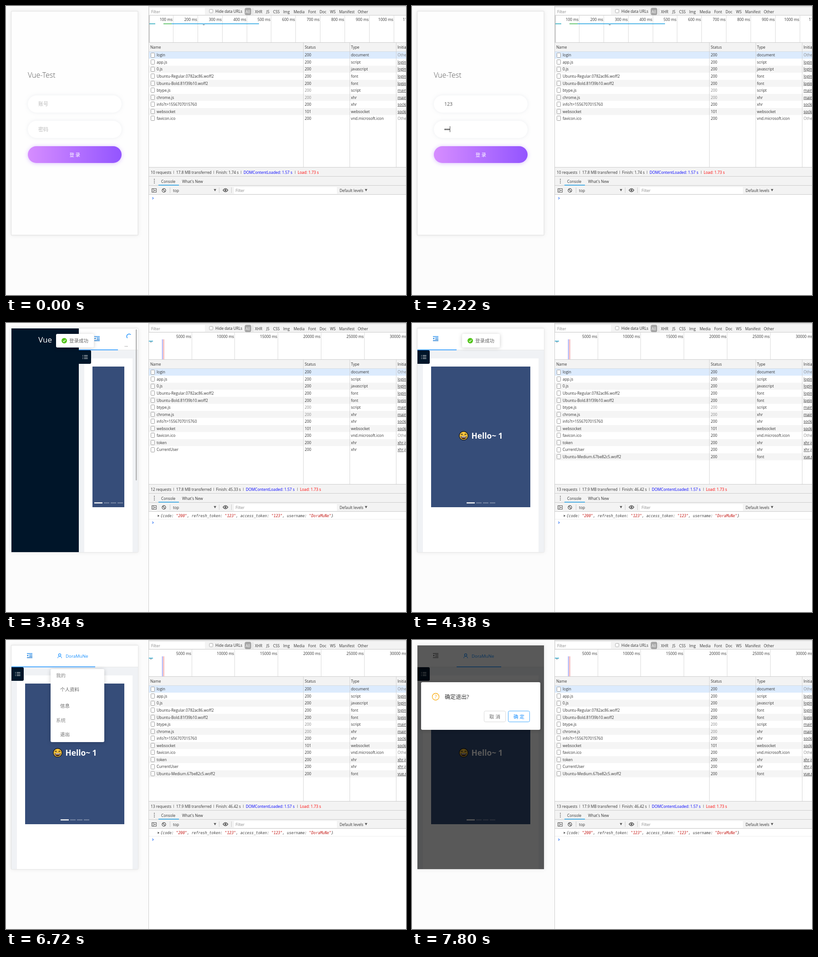
Write an HTML page that moves like this. It is 879 px wide and 637 px high and loops after 8000 ms.

```html
<!DOCTYPE html>
<html lang="zh-CN">
<head>
<meta charset="utf-8">
<title>Login demo</title>
<style>
html,body{margin:0;width:100%;height:100%;overflow:hidden;background:#fcfcfc}
svg{display:block;width:879px;height:637px;font:8.35px "Open Sans","Noto Sans CJK SC","Noto Sans CJK",sans-serif;fill:#333}
text{white-space:pre}
.cjk{font-size:10.5px;fill:#666}
.mute{fill:#888}
.line{stroke:#ccc;fill:none}
.mono{font:italic 8.1px "DejaVu Sans Mono",monospace;fill:#444}
.mono .str{fill:#c41a16}
.card{filter:drop-shadow(0 1px 4px rgba(0,0,0,.2))}
.soft{filter:drop-shadow(0 0 4px rgba(110,120,150,.13))}
.glow{filter:drop-shadow(0 1px 5px rgba(165,100,255,.4))}
#login,#main,#side,.shift,.half,#bar,#toast,#menu,#mask,#modal,#btn{animation:8s linear infinite}
#login{animation-name:leave}
#main{animation-name:enter}
#btn{animation-name:press}
#side{animation-name:side}
.shift{animation-name:shift}
.half{animation-name:half}
#bar{animation-name:bar}
#toast{animation-name:toast}
#menu{animation-name:menu;transform-origin:157px 64px}
#mask{animation-name:mask}
#modal{animation-name:modal;transform-origin:151px 145.5px}
#spin{animation:spin 1s linear infinite;transform-origin:270.5px 29.5px}
@keyframes leave{0%,43.75%{opacity:1}45.5%,100%{opacity:0}}
@keyframes enter{0%,44%{opacity:0}46.5%,100%{opacity:1}}
@keyframes press{0%,33.5%{opacity:1}35%,38%{opacity:.8}40%,100%{opacity:1}}
@keyframes side{0%,48.2%{transform:none;animation-timing-function:ease}52%,100%{transform:translateX(-150px)}}
@keyframes shift{0%,48.2%{transform:translateX(148px);animation-timing-function:ease}52%,100%{transform:none}}
@keyframes half{0%,48.2%{transform:translateX(74px);animation-timing-function:ease}52%,100%{transform:none}}
@keyframes bar{0%,51%{opacity:1}54.75%,100%{opacity:0}}
@keyframes toast{
  0%,40.5%{opacity:0;transform:translateY(-20px);animation-timing-function:ease-out}
  43.5%,72%{opacity:1;transform:none}
  75%,100%{opacity:0;transform:translateY(-8px)}}
@keyframes menu{
  0%,81%{opacity:0;transform:scaleY(.8);animation-timing-function:ease-out}
  84%,93.75%{opacity:1;transform:none}
  96%,100%{opacity:0;transform:scaleY(.8)}}
@keyframes mask{0%,92.5%{opacity:0}93.75%{opacity:.58}95.6%,100%{opacity:1}}
@keyframes modal{
  0%,92.5%{opacity:0;transform:scale(.7)}
  93.75%{opacity:.85;transform:scale(.94)}
  95.6%,100%{opacity:1;transform:none}}
@keyframes spin{from{transform:rotate(58deg)}to{transform:rotate(418deg)}}
</style>
</head>
<body>
<svg viewBox="0 0 879 637">
<defs>
  <linearGradient id="purple"><stop stop-color="#d68dff"/><stop offset="1" stop-color="#9355ff"/></linearGradient>
  <clipPath id="screen"><path d="M12 12h278v493H12z"/></clipPath>
  <g id="fold" fill="none" stroke="currentColor" stroke-width="1.2">
    <path d="M46 29.6h12M51 32.6h7M51 35.8h7M46 38.8h12"/><path d="M49 32v4.4l-2.8-2.2z" fill="currentColor" stroke="none"/>
  </g>
  <g id="user">
    <g fill="none" stroke="currentColor" stroke-width="1.1"><circle cx="118" cy="33" r="2.6"/><path d="M113.8 40a4.2 4.2 0 0 1 8.4 0"/></g>
    <text x="131" y="39" font-size="9.7" fill="currentColor">DoraMuNe</text>
  </g>
</defs>

<path d="M0 0h879v637H0z" fill="#fcfcfc"/>
<rect class="card" x="12" y="12" width="278" height="493" fill="#fff" style="filter:drop-shadow(0 0 4px rgba(0,0,0,.1))"/>
<path d="M11.5 11.5h278.500v493.500H11.500z" fill="#fefefe" stroke="#e0e0e0"/>

<g clip-path="url(#screen)">
  <g id="login">
    <text x="48" y="158" font-size="16" font-weight="300" fill="#555">Vue-Test</text>
    <g fill="#fff" class="soft"><rect x="48" y="197" width="206" height="38" rx="19"/><rect x="48" y="253" width="206" height="38" rx="19"/></g>
    <text class="cjk" x="71" y="220" style="font-size:11px;fill:#bbb" data-on="0 1140">账号</text>
    <text class="cjk" x="71" y="276" style="font-size:11px;fill:#bbb" data-on="0 1980">密码</text>
    <g font-size="10.5" fill="#555">
      <text x="71" y="220" data-on="1140 8000">1</text>
      <text x="77" y="220" data-on="1260 8000">2</text>
      <text x="83" y="220" data-on="1380 8000">3</text>
      <circle cx="73" cy="272" r="1.8" data-on="1980 8000"/>
      <circle cx="77" cy="272" r="1.8" data-on="2100 8000"/>
      <circle cx="81" cy="272" r="1.8" data-on="2220 8000"/>
    </g>
    <g id="carets" stroke="#444"></g>
    <g id="btn">
      <rect class="glow" x="48" y="309" width="206" height="37" rx="18.500" fill="url(#purple)"/>
      <text class="cjk" x="139.500" y="331.500" letter-spacing="2.500" style="fill:#fff">登录</text>
    </g>
  </g>

  <g id="main">
    <path d="M12 12h278v493H12z" fill="#f0f2f5"/>
    <g class="shift">
      <path d="M24 78h254v427H24z" fill="#fff"/>
      <path d="M42 96h218v310H42z" fill="#364d79"/>
    </g>
    <path d="M260 78h18v427h-18z" fill="#fff"/>
    <path d="M278 60h12v445h-12z" fill="#f0f2f5"/>
    <g class="half" fill="#fff">
      <path d="M120 395.300h18v2.400h-18z"/>
      <path d="M141 395.500h12v2h-12zm15 0h12v2h-12zm15 0h12v2h-12z" opacity=".35"/>
    </g>
    <g data-on="4200 8000">
      <circle cx="113.500" cy="248.500" r="9.600" fill="#ffc83d" stroke="#1c1c1c" stroke-width="1.500"/>
      <path d="M107.500 246.500q2-3.500 4 0M115.500 246.500q2-3.500 4 0" fill="none" stroke="#1c1c1c" stroke-width="1.300"/>
      <path d="M107.500 250h12a6 5.500 0 0 1-12 0z" fill="#5b2b1c" stroke="#1c1c1c"/>
      <path d="M108.500 250.300h10v1.700h-10z" fill="#fff"/>
      <text x="130.500" y="255" font-size="17.300" font-weight="700" fill="#fff">Hello~ 1</text>
    </g>
    <path d="M12 12h278v48H12z" fill="#fff"/>
    <path d="M12 59.500h278" stroke="#e8e8e8"/>
    <g class="shift">
      <use href="#fold" color="#595959"/>
      <g data-on="0 7620"><use href="#fold" color="#1890ff"/><path d="M12 59.300h86" stroke="#1890ff" stroke-width="1.600"/></g>
    </g>
    <g data-on="3600 4020">
      <path id="spin" d="M266.800 33.200A5.200 5.200 0 0 1 274.200 25.800" fill="none" stroke="#1890ff" stroke-width="1.500"/>
      <text x="260.500" y="51.500" font-size="9">...</text>
    </g>
    <use href="#user" color="#595959" data-on="4200 6540"/>
    <g data-on="6540 8000"><use href="#user" color="#1890ff"/><path d="M98 59.300h98" stroke="#1890ff" stroke-width="1.600"/></g>
    <g id="side">
      <path d="M12 12h148v493H12z" fill="#001529"/>
      <text x="71" y="43" font-size="17" fill="#fff">Vue</text>
    </g>
    <g class="shift">
      <path d="M12 60h24a3 3 0 0 1 3 3v24a3 3 0 0 1-3 3H12z" fill="#001529"/>
      <path d="M23.500 71.500h8M23.500 75h8M23.500 78.500h8M20 71.500h1.500M20 75h1.500M20 78.500h1.500" stroke="#fff" stroke-width="1.100"/>
    </g>
    <rect id="bar" x="285" y="14" width="2.500" height="333" rx="1.200" fill="#b4b4b4"/>
  </g>

  <path id="mask" d="M12 12h278v493H12z" fill="#000" fill-opacity=".65"/>

  <g id="modal">
    <rect class="card" x="20" y="93" width="262" height="105" rx="3" fill="#fff"/>
    <circle cx="52" cy="125" r="7.500" fill="none" stroke="#faad14" stroke-width="1.300"/>
    <text x="52" y="129" font-size="11" text-anchor="middle" fill="#faad14">?</text>
    <text class="cjk" x="72" y="129.500" style="font-size:12px;fill:#333">确定退出?</text>
    <g fill="#fff"><rect x="158.500" y="156.500" width="47" height="24" rx="3" stroke="#d9d9d9"/><rect x="211.500" y="156.500" width="47" height="24" rx="3" stroke="#40a9ff"/></g>
    <text class="cjk" x="170" y="172.500" letter-spacing="3">取消</text>
    <text class="cjk" x="223" y="172.500" letter-spacing="3" style="fill:#1890ff">确定</text>
  </g>

  <g id="menu">
    <rect class="card" x="98" y="64" width="118" height="161" rx="3" fill="#fff"/>
    <path d="M98 191h118v31H98z" fill="#f0faff" data-on="7440 8000"/>
    <g class="cjk">
      <text x="110" y="82" class="mute">我的</text><text x="119" y="113">个人资料</text><text x="119" y="148.500">信息</text>
      <text x="110" y="180.500" class="mute">系统</text><text x="119" y="211.500" data-on="0 7440">退出</text>
      <text x="119" y="210.500" fill="#1890ff" data-on="7440 8000">退出</text>
    </g>
  </g>

  <g id="toast">
    <rect class="card" x="110" y="24" width="83" height="30" rx="3" fill="#fff"/>
    <circle cx="128" cy="39" r="6" fill="#52c41a"/>
    <path d="M125.200 39.200l2 2.100 3.500-4.300" fill="none" stroke="#fff" stroke-width="1.200"/>
    <text class="cjk" x="139" y="43">登录成功</text>
  </g>
</g>

<g id="tools">
  <path d="M313 0h566v637H313z" fill="#fff"/>
  <path d="M314 0h565v20H314zM314 81h565v19H314zM314 356h565v60H314z" fill="#f3f3f3"/>
  <path d="M316 4h121v15H316zM501 399h226v15H501z" fill="#fff"/>
  <rect x="447" y="7.500" width="7.500" height="7.500" rx="1.500" fill="#fff" stroke="#aaa"/>
  <rect x="524.500" y="4" width="14.500" height="16" rx="4" fill="#a6a6a6"/>
  <path class="line" d="M313.500 0v637M314 1.500h565M314 20.500h565M314 80.500h565M314 100.500h565M314 355.500h565M314 375.500h565M314 395.500h565M314 415.500h565M542.500 5v14M360.500 400v12M468.500 400v12M495.500 400v12"/>
  <g id="overview"></g>
  <g id="rows"></g>
  <path class="line" d="M653.500 81v274M755.500 81v274M857.500 81v274" stroke-opacity=".8"/>
  <g id="labels"></g>
  <g id="status"></g>

  <g fill="#555"><circle cx="326" cy="382" r="1"/><circle cx="326" cy="386" r="1"/><circle cx="326" cy="390" r="1"/></g>
  <path d="M335 394.800h45" stroke="#1a9fe8" stroke-width="1.600"/>
  <g fill="none" stroke="#555">
    <path d="M320.500 402.500h10v8h-10zM323.500 402v9"/><path d="M326 404.500v4l3-2z" fill="#555" stroke="none"/>
    <circle cx="347" cy="406.500" r="4" stroke-width="1.300"/><path d="M344.300 403.800l5.400 5.400" stroke-width="1.300"/>
    <path d="M477 406q5.300-7 10.600 0q-5.300 7-10.600 0z" stroke-width="1.300"/><circle cx="482.300" cy="406" r="1.900" fill="#555" stroke="none"/>
  </g>
  <path d="M456.500 403.500h5.500l-2.750 5zM788.500 403.500h5.500l-2.750 5z" fill="#555"/>
  <path d="M321.500 421.500l2.500 2.300-2.500 2.300" fill="none" stroke="#3d7df5" stroke-width="1.200" data-on="0 3060"/>
  <g data-on="3060 8000">
    <path d="M333.500 422.500v5l3.700-2.500z" fill="#555"/>
    <text class="mono" x="339.500" y="428">{code: <tspan class="str">"200"</tspan>, refresh_token: <tspan class="str">"123"</tspan>, access_token: <tspan class="str">"123"</tspan>, username: <tspan class="str">"DoraMuNe"</tspan>}</text>
    <path d="M314 432.500h565" stroke="#eee"/>
    <path d="M321.500 437.700l2.500 2.300-2.500 2.300" fill="none" stroke="#3d7df5" stroke-width="1.200"/>
  </g>
</g>
</svg>
<script>
const LOOP = 8000;
const add = (id, html) => document.getElementById(id).insertAdjacentHTML('beforeend', html);
const text = (x, y, s, attrs = '') => `<text x="${x}" y="${y}" ${attrs}>${s}</text>`;

// Text carets: x, y, from, to
[[71.5, 209, 720, 1140], [78, 209, 1140, 1260], [84, 209, 1260, 1380], [90, 209, 1380, 1800],
 [71.5, 265, 1800, 1980], [75.500, 265, 1980, 2100], [79.500, 265, 2100, 2220], [83.500, 265, 2220, LOOP]]
  .forEach(([x, y, a, b]) => add('carets', `<path d="M${x} ${y}v13" data-on="${a} ${b}"/>`));

// Timeline overview
function scale(step, ms, on, marks) {
  let out = '';
  for (let i = 1; i < 12; i++) {
    const x = Math.round(313.7 + i * step) - .5;
    out += `<path class="line" d="M${x} 21v59" stroke-opacity=".7"/>` + text(x - 1.5, 33, i * ms + ' ms', 'text-anchor="end"');
  }
  add('overview', `<g data-on="${on}">${out}${marks}</g>`);
}
const dash = (d, color, w = 1.5) => `<path d="${d}" stroke="${color}" stroke-width="${w}"/>`;
scale(53.95, 100, `0 2880`,
  dash('M315 21v59', '#999', 1) + dash('M315 39.300h13', '#1ba3b8') + dash('M346 39.300h18', '#3cb54a') +
  dash('M364 39.300h192', '#1a9fe0') + dash('M432.500 41.500h4', '#456', 1));
scale(94.8, 5000, `2880 ${LOOP}`,
  dash('M314 40h9', '#1a9fc8') + dash('M317 42h3', '#456', 1) +
  dash('M343.700 36v44', '#5a5ae0', 1) + dash('M346.700 36v44', '#e85a5a', 1));

// Request rows: name, status, type, initiator, time of arrival
[['login', 200, 'document', 'Other'], ['app.js', 200, 'script', 'login'], ['0.js', 200, 'javascript', 'login'],
 ['Ubuntu-Regular.0782ac86.woff2', 200, 'font', 'login'], ['Ubuntu-Bold.81f39b10.woff2', 200, 'font', 'login'],
 ['btype.js', 200, 'script', 'main.js'], ['chrome.js', 200, 'xhr', 'main.js'], ['info?t=1556707015760', 200, 'xhr', 'sockjs'],
 ['websocket', 101, 'websocket', 'sockjs'], ['favicon.ico', 200, 'vnd.microsoft.icon', 'Other'],
 ['token', 200, 'xhr', 'xhr.js', 2880], ['CurrentUser', 200, 'xhr', 'xhr.js', 2880],
 ['Ubuntu-Medium.67be82c5.woff2', 200, 'font', 'vue.runtime', 4200]]
  .forEach(([name, code, type, from, t = 0], i) => {
    const y = 100.5 + i * 15.55, base = y + 10.8;
    const fill = i ? (i % 2 ? '#fff' : '#f5f5f5') : '#dcebfd';
    const cached = i === 5 || i === 6;
    add('rows', `<g data-on="${t} ${LOOP}"><rect x="314" y="${y}" width="565" height="15.550" fill="${fill}"/>
      <rect x="318.500" y="${Math.round(y + 2) + .5}" width="8" height="10" rx="1" fill="#fff" stroke="#999"/>` +
      text(331, base, name) + text(656.5, base, code, cached ? 'class="mute"' : '') + text(758, base, type) +
      text(860.5, base, from, from === 'Other' ? 'class="mute"' : 'text-decoration="underline"') + '</g>');
  });

[[319, 15.5, 'Filter', 1], [460, 15, 'Hide data URLs'], [547, 15.5, 'XHR'], [572, 15.5, 'JS'], [587, 15.5, 'CSS'],
 [609, 15.5, 'Img'], [632, 15.5, 'Media'], [664, 15.5, 'Font'], [689, 15.5, 'Doc'], [712, 15.5, 'WS'],
 [732, 15.5, 'Manifest'], [773, 15.5, 'Other'], [317, 94, 'Name'], [656.5, 94, 'Status'], [758, 94, 'Type'],
 [860.5, 94, 'Initiator'], [341, 389.5, 'Console'], [387, 389.5, "What's New"], [367, 409.5, 'top'],
 [504.5, 410, 'Filter', 1], [733, 409.5, 'Default levels']]
  .forEach(([x, y, s, mute]) => add('labels', text(x, y, s, mute ? 'class="mute"' : '')));
add('labels', text(526.5, 15.5, 'All', 'style="fill:#fff"'));

// Summary line under the table
function summary(on, count, mb, finish, dx) {
  const y = 369.5, bar = x => `<path d="M${x} 363v7" stroke="#777" stroke-width=".8"/>`;
  add('status', `<g data-on="${on}">` + text(318, y, count + ' requests') + bar(368.5) + text(374, y, mb + ' MB transferred') +
    bar(456.5) + text(461.5, y, `Finish: ${finish} s`) + bar(516.5 + dx) +
    text(522 + dx, y, 'DOMContentLoaded: 1.57 s', 'fill="#00f"') + bar(635.5 + dx) +
    text(641 + dx, y, 'Load: 1.73 s', 'fill="#f00"') + '</g>');
}
summary('0 2880', 10, 17.8, '1.74', 0);
summary('2880 4200', 12, 17.8, '45.33', 5);
summary(`4200 ${LOOP}`, 13, 17.9, '46.42', 5);

// Hard cuts: data-on="from to" in ms
const rules = new Map();
document.querySelectorAll('[data-on]').forEach(el => {
  const [a, b] = el.dataset.on.split(' ').map(Number);
  if (!a && b === LOOP) return;
  const name = `on-${a}-${b}`, pct = t => t / LOOP * 100 + '%';
  rules.set(name, `@keyframes ${name}{` + (a ? '0%{opacity:0}' : '') + `${pct(a)}{opacity:1}${pct(b)}{opacity:0}` +
    (b < LOOP ? '100%{opacity:0}' : '') + '}');
  el.style.animation = `${name} ${LOOP}ms step-end infinite`;
});
document.head.appendChild(document.createElement('style')).textContent = [...rules.values()].join('\n');
</script>
</body>
</html>
```
